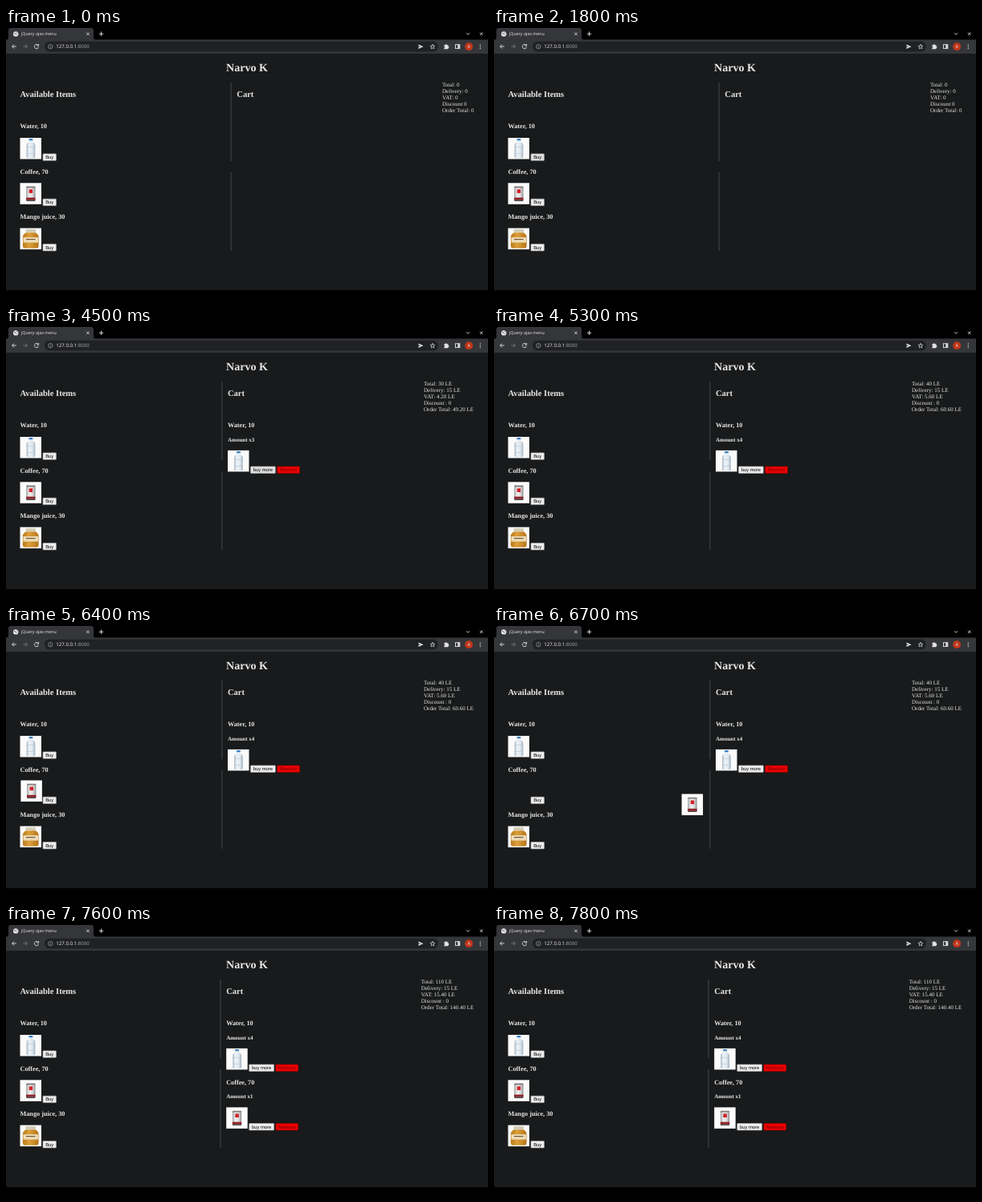
Animation of 600 by 338 pixels, one loop 8 s. Source, as an HTML page:

```html
<!DOCTYPE html>
<html lang="en">
<head>
<meta charset="utf-8">
<title>Shop menu</title>
<style>
  html, body { margin: 0; width: 100%; height: 100%; overflow: hidden; background: #000; }
  svg { display: block; width: 100vw; height: 100vh; }
  text { text-rendering: geometricPrecision; fill: #e8e6e3; font-family: "Liberation Serif", serif; }
  h1, .h1, .h2, .h3, .h4 { font-weight: bold; }
  .h1 { font-size: 14.06px; text-anchor: middle; }
  .h2 { font-size: 10.54px; }
  .h3 { font-size: 8.22px; }
  .h4, .sum { font-size: 7.03px; }
  .btn { font: 5.85px "Liberation Sans", sans-serif; text-anchor: middle; fill: #000; }
  .ui { font-family: "Noto Sans", sans-serif; }
  .icon { fill: none; stroke: #e4e4e4; stroke-width: .9; }
</style>
</head>
<body>
<svg viewBox="0 0 600 338" preserveAspectRatio="none">
  <defs>
    <linearGradient id="glass">
      <stop stop-color="#a9b9c8"/><stop offset=".3" stop-color="#edf3f7"/>
      <stop offset=".7" stop-color="#dfe8ef"/><stop offset="1" stop-color="#9fb0c0"/>
    </linearGradient>
    <linearGradient id="tin">
      <stop stop-color="#a6a6a6"/><stop offset=".35" stop-color="#f0f0f0"/>
      <stop offset=".7" stop-color="#dcdcdc"/><stop offset="1" stop-color="#8c8c8c"/>
    </linearGradient>
    <linearGradient id="mango">
      <stop stop-color="#b9791a"/><stop offset=".4" stop-color="#dda03a"/><stop offset="1" stop-color="#b57418"/>
    </linearGradient>
    <g id="water">
      <rect width="26.5" height="26.5" fill="#fbfbfb"/>
      <rect x="11" y="1" width="4.8" height="2.6" rx=".6" fill="#3f7fc4"/>
      <path d="M11.3 3.6h4.2v1.6q3.3 1.2 3.3 4v14.2q0 2-2 2h-6.8q-2 0-2-2V9.200q0-2.800 3.300-4z" fill="url(#glass)"/>
      <path d="M8.200 11.500h10.400M8.200 19.500h10.400" stroke="#b4c3d0" stroke-width=".6"/>
    </g>
    <g id="coffee">
      <rect width="26.500" height="26.500" fill="#fbfbfb"/>
      <rect x="7.600" y="4.500" width="11.400" height="18" rx="1" fill="url(#tin)"/>
      <rect x="7.600" y="4.300" width="11.400" height="1.800" rx=".8" fill="#85807e"/>
      <rect x="11.200" y="8" width="4.400" height="4.600" fill="#d32027"/>
      <rect x="7.600" y="18.300" width="11.400" height="3" fill="#8f2028"/>
      <rect x="7.800" y="21.300" width="11" height="1.300" rx=".6" fill="#4e4646"/>
    </g>
    <g id="juice">
      <rect width="26.500" height="26.500" fill="#fbfbfb"/>
      <rect x="7" y="1.500" width="12.600" height="4.200" rx="1" fill="#d5cdb9"/>
      <path d="M7.500 5.700h11.600q4 2 4 5.500v11q0 3-3 3H6.400q-3 0-3-3v-11q0-3.500 4.100-5.500z" fill="url(#mango)"/>
      <rect x="4" y="11.500" width="18.600" height="6.500" fill="#ecdcb8"/>
      <path d="M7.500 14h11.500" stroke="#77573a" stroke-width="1.200"/>
    </g>
  </defs>

  <path d="M0 14.500H1.500Q3 14 3 12V3Q3 0 6 0H106Q109 0 109 3V12Q109 14 111 14.500H600V32H0Z" fill="#35363a"/>
  <rect x="48" y="16.700" width="490" height="12.800" rx="6.400" fill="#202124"/>
  <rect y="32" width="600" height="295" fill="#181a1b"/>

  <circle cx="12.200" cy="7.400" r="3.200" fill="#e8e8e8"/>
  <path d="M10 6.500l2 .5 1.200 1.700M13 4.800l1.500 1.500" stroke="#55565a" stroke-width=".9" fill="none"/>
  <text class="ui" x="19" y="9.300" font-size="5.270">jQuery ajax menu</text>
  <text class="ui" x="62.300" y="25.400" font-size="6.100">127.0.0.1<tspan fill="#9aa0a6">:8000</tspan></text>
  <g class="icon">
    <path d="M100.200 5.700l3.400 3.400m0-3.400l-3.400 3.400M115.800 7.300h5.400m-2.700-2.700v5.400M573 6.300l2 2 2-2M590 5.600l3.400 3.400m0-3.400l-3.400 3.400"/>
    <path d="M12.800 23H7.600m2.500-2.500L7.600 23l2.500 2.500"/>
    <path d="M21.400 23h5.200m-2.500-2.500l2.500 2.500-2.500 2.500" stroke="#77787c"/>
    <path d="M40 21.400a2.600 2.600 0 1 0 .5 2.400M40.600 20v2.200h-2.200"/>
    <g stroke="#a5a8ac" stroke-width=".7"><circle cx="55.300" cy="23.200" r="2.700"/><path d="M55.300 22.800v1.900m0-3.200v.7"/></g>
    <path d="M531 20.300l.8 2 2.100.1-1.600 1.400.5 2.100-1.800-1.200-1.800 1.200.5-2.100-1.600-1.400 2.100-.1z" stroke-width=".7"/>
    <rect x="559.500" y="20.700" width="5.300" height="4.900"/>
  </g>
  <g fill="#e4e4e4">
    <path d="M513.500 20.500l6 2.700-6 2.700v-2.100l3.200-.6-3.200-.6z"/>
    <path d="M545.300 21.300h1.600a1 1 0 0 1 2 0h1.600v1.600a1 1 0 0 1 0 2v1.400h-5.200v-1.500a1 1 0 0 0 0-2z"/>
    <rect x="562.400" y="20.700" width="2.400" height="4.900"/>
    <circle cx="590.300" cy="20.900" r=".65"/><circle cx="590.300" cy="23.200" r=".65"/><circle cx="590.300" cy="25.500" r=".65"/>
  </g>
  <circle cx="576.200" cy="23.200" r="4.900" fill="#c2361b"/>
  <text class="ui" x="576.200" y="25.200" font-size="5.400" text-anchor="middle">A</text>

  <text class="h1" x="300" y="53.800">Narvo K</text>
  <text class="h2" x="17.500" y="85.500">Available Items</text>
  <g id="page"></g>
</svg>
<script>
const LOOP = 8000, COFFEE_IN_CART = 7500;
const FLIGHT = { start: 6400, end: 6930, from: [17.5, 192.5], to: [310, 229] };
const WATER_CLICKS = [2300, 4000, 4500, 5000];
const WATER = ['water', 'Water', 10];
const COFFEE = ['coffee', 'Coffee', 70];
const JUICE = ['juice', 'Mango juice', 30];
const page = document.getElementById('page');

const text = (cls, x, y, s) => `<text class="${cls}" x="${x}" y="${y}">${s}</text>`;
const picture = (id, x, y) => `<use href="#${id}" x="${x}" y="${y}"/>`;

function button(x, y, w, label, fill = '#efefef', ink = '#000') {
  const edge = ink === '#000' ? '#a8a8a8' : '#8a0000';
  return `<rect x="${x + .3}" y="${y + .3}" width="${w - .6}" height="8.4" rx=".6" fill="${fill}" stroke="${edge}" stroke-width=".7"/>` +
    `<text class="btn" x="${x + w / 2}" y="${y + 6.5}" style="fill:${ink}">${label}</text>`;
}

function shopItem([id, name, price], y, hovered, away) {
  return text('h3', 17.5, y, `${name}, ${price}`) +
    (away ? '' : picture(id, 17.5, y + 11.7)) +
    button(45.7, y + 31.3, 17, 'Buy', hovered ? '#e0e0e0' : '#efefef');
}

function cartItem([id, name, price], amount, x, y, hovered) {
  return text('h3', x, y, `${name}, ${price}`) +
    text('h4', x, y + 17.6, `Amount x${amount}`) +
    picture(id, x, y + 28.6) +
    button(x + 28.2, y + 48.4, 31.4, 'buy more', hovered ? '#e0e0e0' : '#efefef') +
    button(x + 61.3, y + 48.4, 28.5, 'Remove', '#f00000', '#700000');
}

function summary(total) {
  if (!total) return ['Total: 0', 'Delivery: 0', 'VAT: 0', 'Discount 0', 'Order Total: 0'];
  const vat = total * .14;
  return [`Total: ${total} LE`, 'Delivery: 15 LE', `VAT: ${vat.toFixed(2)} LE`,
    'Discount : 0', `Order Total: ${(total + 15 + vat).toFixed(2)} LE`];
}

function flyingCoffee(t) {
  const p = Math.min(1, (t - FLIGHT.start) / (FLIGHT.end - FLIGHT.start));
  const ease = [1 - (1 - p) ** 1.6, p ** 1.35];
  const [x, y] = FLIGHT.from.map((a, i) => a + (FLIGHT.to[i] - a) * ease[i]);
  return picture('coffee', x, y);
}

function render(t) {
  const waters = WATER_CLICKS.filter(click => t >= click).length;
  const coffees = t >= COFFEE_IN_CART ? 1 : 0;
  const flying = t >= FLIGHT.start && !coffees;
  const [cartX, sumX] = coffees ? [274.2, 516.7] : waters ? [276, 520] : [287.3, 543];

  let out = `<path d="M${cartX - 7.2} 68v98m0 14v98" stroke="#45494b" stroke-width="1"/>` +
    text('h2', cartX, 85.5, 'Cart') +
    summary(waters * 10 + coffees * 70).map((s, i) => text('sum', sumX, 73.4 + i * 7.9, s)).join('') +
    shopItem(WATER, 125.3, t >= 1800 && t < 2600) +
    shopItem(COFFEE, 181.6, false, flying) +
    shopItem(JUICE, 237.9);
  if (waters) out += cartItem(WATER, waters, cartX, 125.3, t >= 3500 && t < 5200);
  if (coffees) out += cartItem(COFFEE, coffees, cartX, 198.8);
  if (flying) out += flyingCoffee(t);
  page.innerHTML = out;
}

function tick() {
  render(performance.now() % LOOP);
  requestAnimationFrame(tick);
}
tick();
</script>
</body>
</html>
```
